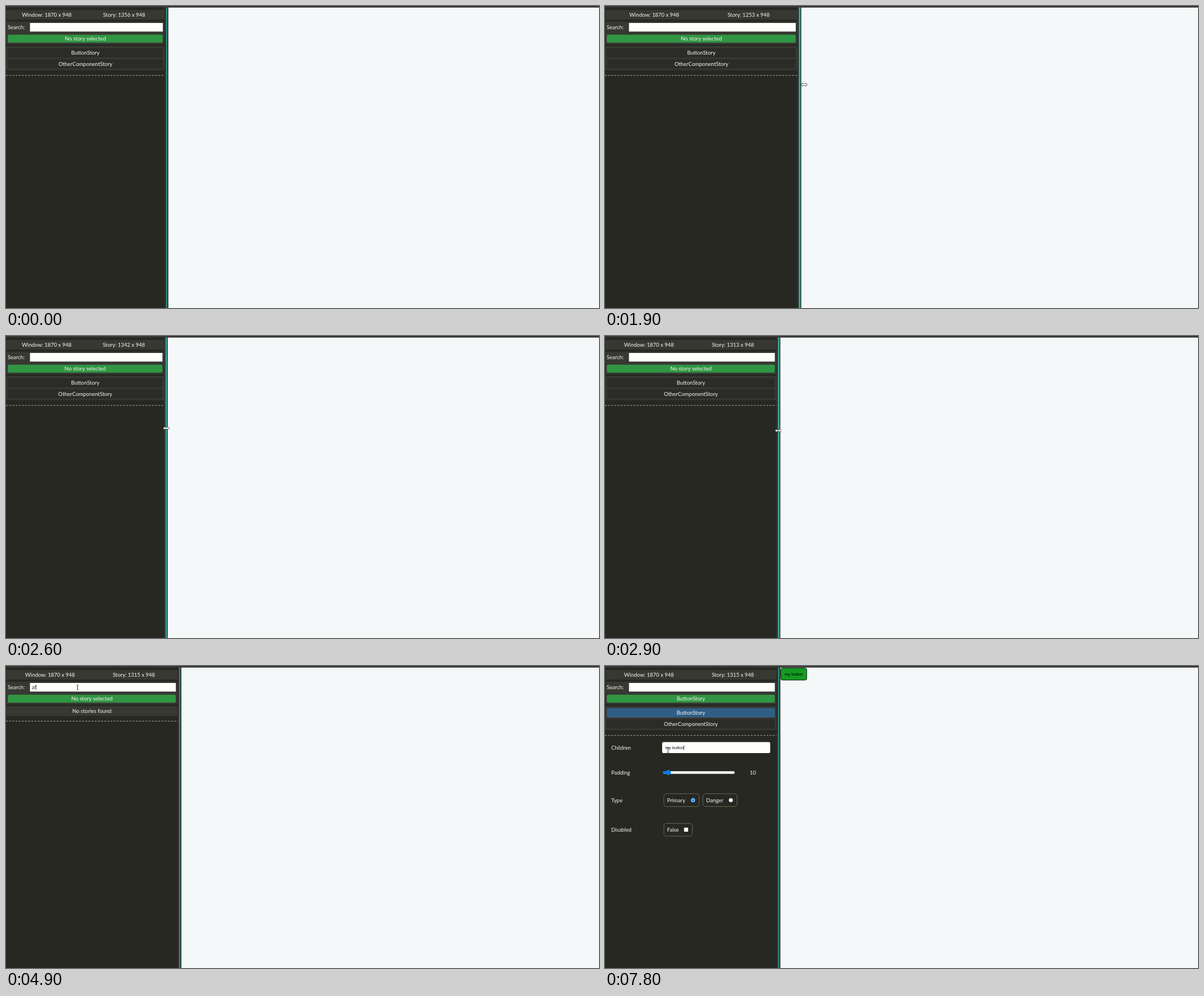
Animation, 1048 px wide and 534 px high, one loop 8 s. Source, as an HTML page with a canvas:

```html
<!DOCTYPE html>
<html lang="en">
<head>
<meta charset="utf-8">
<title>Story panel</title>
<style>
  html, body { margin: 0; width: 100%; height: 100%; overflow: hidden; background: #272822; }
  canvas { display: block; width: 1048px; height: 534px; }
</style>
</head>
<body>
<canvas id="stage"></canvas>
<script>
const W = 1048, H = 534, LOOP = 8000, STEP = 100;
const SCALE = W / 1870;
const UI = '9.45px Lato, "Open Sans", sans-serif';
const INPUT = '8.9px Lato, "Open Sans", sans-serif';
const FORM = '7.47px "Liberation Sans", Arial, sans-serif';
const C = {
  body: '#272822', panel: '#383833', item: '#2b2b28', hover: '#1f201c',
  green: '#309643', blue: '#305f86', text: '#f8f8f2', paper: '#f4f8f8',
  field: '#fffffd', frame: '#6e6552', accent: '#0b79ee'
};

const canvas = document.getElementById('stage');
const ratio = window.devicePixelRatio || 1;
canvas.width = W * ratio;
canvas.height = H * ratio;
const g = canvas.getContext('2d');

// left edge of the story area: [time, x]
const edgePath = [
  [1500, 286.66], [1600, 289], [1700, 298], [1800, 318.7], [1900, 346.6],
  [2000, 375], [2100, 398.5], [2200, 414], [2400, 412.5], [2500, 389],
  [2600, 286], [2700, 223], [2800, 323.6], [2900, 309.64]
];

// pointer hot spot: [time, x, y]
const pointerPath = [
  [700, 218, 526], [900, 240, 400], [1100, 283, 232], [1300, 297, 160],
  [1500, 286, 136], [1600, 290, 136], [1800, 325, 138], [1900, 352, 139],
  [2100, 401, 150], [2200, 411, 155.5], [2400, 410, 157], [2500, 386, 159],
  [2600, 283, 163], [2700, 220, 165], [2800, 320, 167], [2900, 306, 167.3],
  [3100, 235, 105], [3300, 130, 46], [3400, 128, 40], [3500, 126.5, 38.4],
  [3600, 126.5, 38.4], [3700, 126.5, 37.8], [6200, 126.5, 37.8],
  [6300, 132, 55], [6400, 139, 76], [6500, 142.5, 84], [6900, 142.5, 84],
  [7000, 150, 117], [7100, 150, 117], [7400, 134, 136], [7600, 116, 146],
  [7800, 111.3, 148.6]
];

const typed = [
  [0, ''], [3900, 'af'], [4300, 'aff'], [4400, 'affd'], [4600, 'aff'],
  [4900, 'af'], [5000, 'a'], [5100, ''], [5900, 'a'], [6100, '']
];

function along(path, t) {
  if (t <= path[0][0]) return path[0].slice(1);
  for (let i = 1; i < path.length; i++) {
    const a = path[i - 1], b = path[i];
    if (t <= b[0]) {
      const k = (t - a[0]) / (b[0] - a[0]);
      return a.slice(1).map((v, j) => v + (b[j + 1] - v) * k);
    }
  }
  return path[path.length - 1].slice(1);
}

const within = (t, a, b) => t >= a && t < b;
const edgeAt = t => along(edgePath, t)[0];
const queryAt = t => typed.filter(k => k[0] <= t).pop()[1];

function rect(x, y, w, h, fill) {
  g.fillStyle = fill;
  g.fillRect(x, y, w, h);
}

function round(x, y, w, h, r, fill, stroke) {
  g.beginPath();
  g.roundRect(x, y, w, h, r);
  if (fill) { g.fillStyle = fill; g.fill(); }
  if (stroke) { g.strokeStyle = stroke; g.lineWidth = 1; g.stroke(); }
}

function disc(x, y, r, fill) {
  g.beginPath();
  g.arc(x, y, r, 0, 7);
  g.fillStyle = fill;
  g.fill();
}

function label(s, x, mid, align = 'left', font = UI, fill = C.text) {
  g.font = font;
  g.fillStyle = fill;
  g.textAlign = align;
  g.fillText(s, x, mid + (font === FORM ? 2.5 : 3.3));
}

function caret(x, y) {
  rect(x, y, 0.7, 8.6, '#111');
}

function drawDivider(x, active) {
  rect(x - 6, 2.5, 6, H, active ? '#30403e' : '#2b2c28');
  rect(x - 4.6, 2.5, 1, H, active ? '#275a55' : '#4b454b');
  rect(x - 3.5, 2.5, 2, H, active ? '#48b5a8' : '#259080');
  rect(x - 1.5, 2.5, 1.5, H, active ? '#29524d' : '#2d3a38');
}

function drawItem(name, y, w, fill) {
  rect(3.2, y, w - 6.8, 16.6, fill);
  label(name, w / 2, y + 8.2, 'center');
}

function drawPanel(t, w, query, picked, mouse) {
  const size = Math.round(1870 - (edgeAt(t - 8) + 1.4) / SCALE);
  rect(0.6, 7, w - 1.2, 17, C.panel);
  label('Window: 1870 x 948', w / 4 + 1.9, 15.4, 'center');
  label(`Story: ${size} x 948`, w * 0.75 - 1.8, 15.4, 'center');

  rect(0.6, 27.6, w - 1.2, 40, C.panel);
  label('Search:', 3, 37.8);
  rect(42.4, 30, w - 45.9, 15.2, C.field);
  label(query, 45.6, 37.6, 'left', INPUT, '#333');
  if (within(t, 3500, 5600) || within(t, 5900, 6400)) {
    g.font = INPUT;
    caret(45.4 + g.measureText(query).width, 33.4);
  }
  round(3.2, 50.7, w - 6.8, 14.1, 2.8, C.green);
  label(picked ? 'ButtonStory' : 'No story selected', w / 2, 58, 'center');

  const listHeight = query ? 17.4 : 42.4;
  rect(0.6, 71, w - 1.2, listHeight, C.panel);
  if (query) {
    label('No stories found', w / 2, 80, 'center');
  } else {
    const tone = y => overItem(mouse, y, w) ? C.hover : C.item;
    drawItem('ButtonStory', 74.4, w, picked ? C.blue : tone(74.4));
    drawItem('OtherComponentStory', 94, w, tone(94));
  }

  g.strokeStyle = '#a9a9a4';
  g.lineWidth = 1.12;
  g.setLineDash([3.36, 2.24]);
  g.beginPath();
  g.moveTo(0, query ? 97.5 : 122.8);
  g.lineTo(w, query ? 97.5 : 122.8);
  g.stroke();
  g.setLineDash([]);
}

function drawOption(name, x, y, w) {
  round(x, y, w, 22.6, 4.5, null, C.frame);
  label(name, x + 5.8, y + 11.4);
}

function drawControls(t) {
  label('Children', 11, 145);
  round(101, 134.6, 191, 19.4, 2.8, C.field);
  label('my button', 106.6, 144.4, 'left', FORM, '#111');
  if (t >= 7600) caret(139.2, 140);

  label('Padding', 11, 188.6);
  round(102.6, 186, 126.6, 4.8, 2.4, '#efefef');
  round(102.6, 186, 10, 4.8, 2.4, C.accent);
  disc(112, 188.4, 4.5, C.accent);
  label('10', 261.3, 188.6, 'center');

  label('Type', 11, 237.2);
  drawOption('Primary', 104, 225.9, 62.5);
  disc(155.6, 237.2, 3.9, C.accent);
  disc(155.6, 237.2, 3, '#fff');
  disc(155.6, 237.2, 2.2, C.accent);
  drawOption('Danger', 173, 225.9, 60.5);
  disc(222.4, 237.2, 3.8, '#777');
  disc(222.4, 237.2, 3.3, '#fff');

  label('Disabled', 11, 289.5);
  drawOption('False', 104, 278.2, 50.5);
  round(139.7, 285.8, 7.2, 7.2, 1, '#fff');
}

function overItem(m, y, w) {
  return m && m.x > 3 && m.x < w - 3 && m.y > y && m.y < y + 16.6;
}

function pointerKind(t, m, w, picked) {
  if (within(t, 1200, 3000)) return 'resize';
  const inSearch = m.x > 42 && m.x < w - 3 && m.y > 30 && m.y < 45.2;
  const inText = picked && m.x > 101 && m.x < 292 && m.y > 134.6 && m.y < 154;
  if (inSearch || inText) return 'beam';
  return overItem(m, 74.4, w) || overItem(m, 94, w) ? 'hand' : 'arrow';
}

const shapes = {
  arrow: 'M0 0V9L2.1 7.1 3.5 10.2 5 9.5 3.7 6.5H6.5Z',
  resize: 'M-5.3 0L-2.4-2.7V-.9H2.4V-2.7L5.3 0 2.4 2.7V.9H-2.4V2.7Z',
  hand: 'M-1.1.8Q0-.7 1 .8V3.4L4.6 4.3Q5.2 4.6 5 6L4.2 9H-.4L-3.3 5.6Q-3-.0-1.1 6Z'
};

function drawPointer(kind, m) {
  g.save();
  g.translate(m.x, m.y);
  if (kind === 'beam') {
    const beam = new Path2D('M-1.8-4.2Q0-4.2 0-3.4Q0-4.2 1.8-4.2M0-3.4V3.6M-1.8 4.3Q0 4.3 0 3.6Q0 4.3 1.8 4.3');
    g.strokeStyle = '#222';
    g.lineWidth = 0.9;
    g.stroke(beam);
  } else {
    const shape = new Path2D(shapes[kind]);
    g.lineJoin = 'round';
    g.strokeStyle = '#111';
    g.lineWidth = 1.1;
    g.stroke(shape);
    g.fillStyle = '#fff';
    g.fill(shape);
  }
  g.restore();
}

function draw(t) {
  const edge = edgeAt(t), w = edge - 6;
  const query = queryAt(t), picked = t >= 6900;
  const [x, y] = along(pointerPath, t);
  const mouse = t >= 700 ? { x, y } : null;

  g.setTransform(ratio, 0, 0, ratio, 0, 0);
  rect(0, 0, W, H, C.body);
  rect(edge, 2.5, W - edge, H, C.paper);
  rect(0, 0, W, 2.5, '#383838');
  drawPanel(t, w, query, picked, mouse);
  drawDivider(edge, within(t, 1200, 3000));
  if (picked) {
    drawControls(t);
    round(310.7, 3.7, 45.8, 21.2, 3, '#159b20', '#0b1a0c');
    label('my button', 333.6, 14.4, 'center', FORM, '#000');
  }
  if (mouse) drawPointer(pointerKind(t, mouse, w, picked), mouse);
}

const start = performance.now();
function tick() {
  const t = (performance.now() - start) % LOOP;
  draw(Math.floor(t / STEP) * STEP);
  requestAnimationFrame(tick);
}
tick();
</script>
</body>
</html>
```
